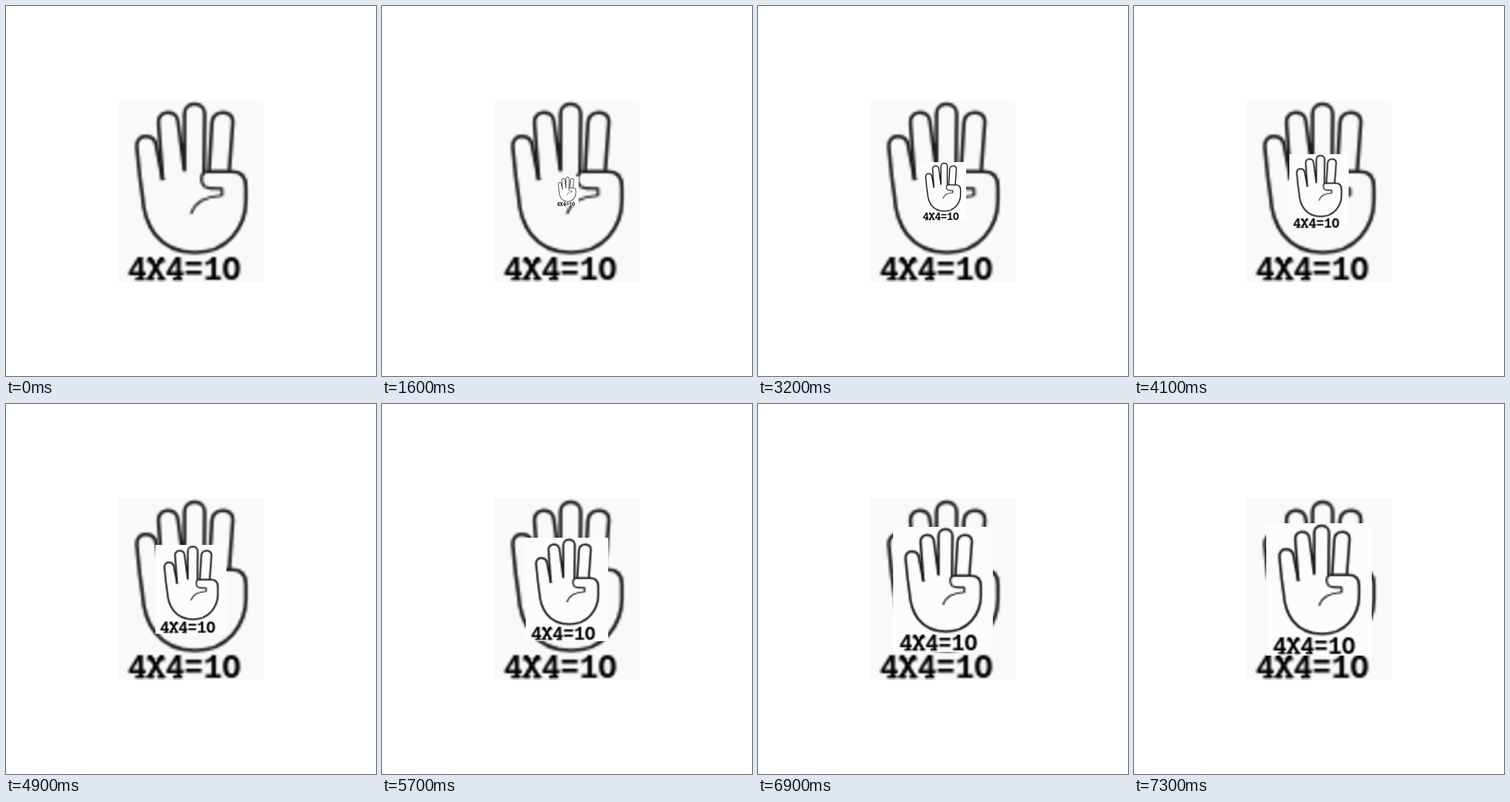
Write an HTML page with a canvas that moves like this. It is 512x512 px and loops after 7400 ms.

```html
<!DOCTYPE html>
<html lang="en">
<head>
<meta charset="utf-8">
<style>
  html, body { margin: 0; width: 100%; height: 100%; overflow: hidden; background: #fff; }
  canvas { display: block; width: 100vmin; height: 100vmin; }
</style>
</head>
<body>
<canvas id="stage" width="512" height="512"></canvas>
<script>
const CARD = { x: 156, y: 131, w: 200, h: 251 };
const STEP = 100, STEPS = 74;

const outline = new Path2D(
  'M217 241 L208 194 C206 176 179 176 181 195 L185 235 L189 264 ' +
  'C191 300 209 341 262 341 C306 341 332 306 332 270 L332 250 ' +
  'C332 234 325 229 312 229 L276 229');
const fingers = new Path2D(
  'M217 241 L211 162 C209 143 236 143 238 160 L247 229 ' +
  'M247 229 L247 150 C247 131 275 131 275 150 L274 232 ' +
  'M281 228 L285 162 C286 143 314 143 314 160 L309 228');
const thumb = new Path2D(
  'M276 229 C267 234 269 252 282 252 L299 253 L299 262 C275 264 261 271 256 287');

// The hand is drawn on a coarse grid, so enlarging it gives soft, blocky lines.
function makeHand() {
  const sprite = document.createElement('canvas');
  sprite.width = 64;
  sprite.height = 80;
  const c = sprite.getContext('2d');
  c.scale(sprite.width / CARD.w, sprite.height / CARD.h);
  c.translate(-CARD.x, -CARD.y);

  c.strokeStyle = '#1c1c1c';
  c.lineWidth = 4.8;
  c.lineJoin = 'round';
  c.stroke(outline);
  c.stroke(fingers);
  c.lineWidth = 3.6;
  c.stroke(thumb);

  c.fillStyle = '#000';
  c.font = 'bold 43.6px "Liberation Mono", monospace';
  c.fillText('4X4=1O', 168.5, 379.5);
  // Slab serifs on the X and the feet of the fours
  for (const y of [351, 375.5]) for (const x of [195, 210]) c.fillRect(x, y, 10, 4);
  for (const x of [179, 231]) c.fillRect(x, 375.5, 13, 4);
  return sprite;
}

const ctx = document.getElementById('stage').getContext('2d');
const hand = makeHand();
ctx.imageSmoothingQuality = 'high';

function drawCard(scale, color) {
  const midX = CARD.x + CARD.w / 2, midY = CARD.y + CARD.h / 2;
  const left = Math.round(midX - CARD.w * scale / 2);
  const right = Math.round(midX + CARD.w * scale / 2);
  const top = Math.round(midY - CARD.h * scale / 2);
  const bottom = Math.round(midY + CARD.h * scale / 2);
  ctx.fillStyle = color;
  ctx.fillRect(left, top, right - left, bottom - top);
  ctx.drawImage(hand, left, top, right - left, bottom - top);
}

function draw(now) {
  const step = Math.floor(now / STEP) % STEPS;
  ctx.fillStyle = '#fff';
  ctx.fillRect(0, 0, 512, 512);
  drawCard(1, '#f9f9f9');
  if (step > 0) drawCard(step / 100, '#fcfcfc');
  requestAnimationFrame(draw);
}
draw(performance.now());
</script>
</body>
</html>
```
